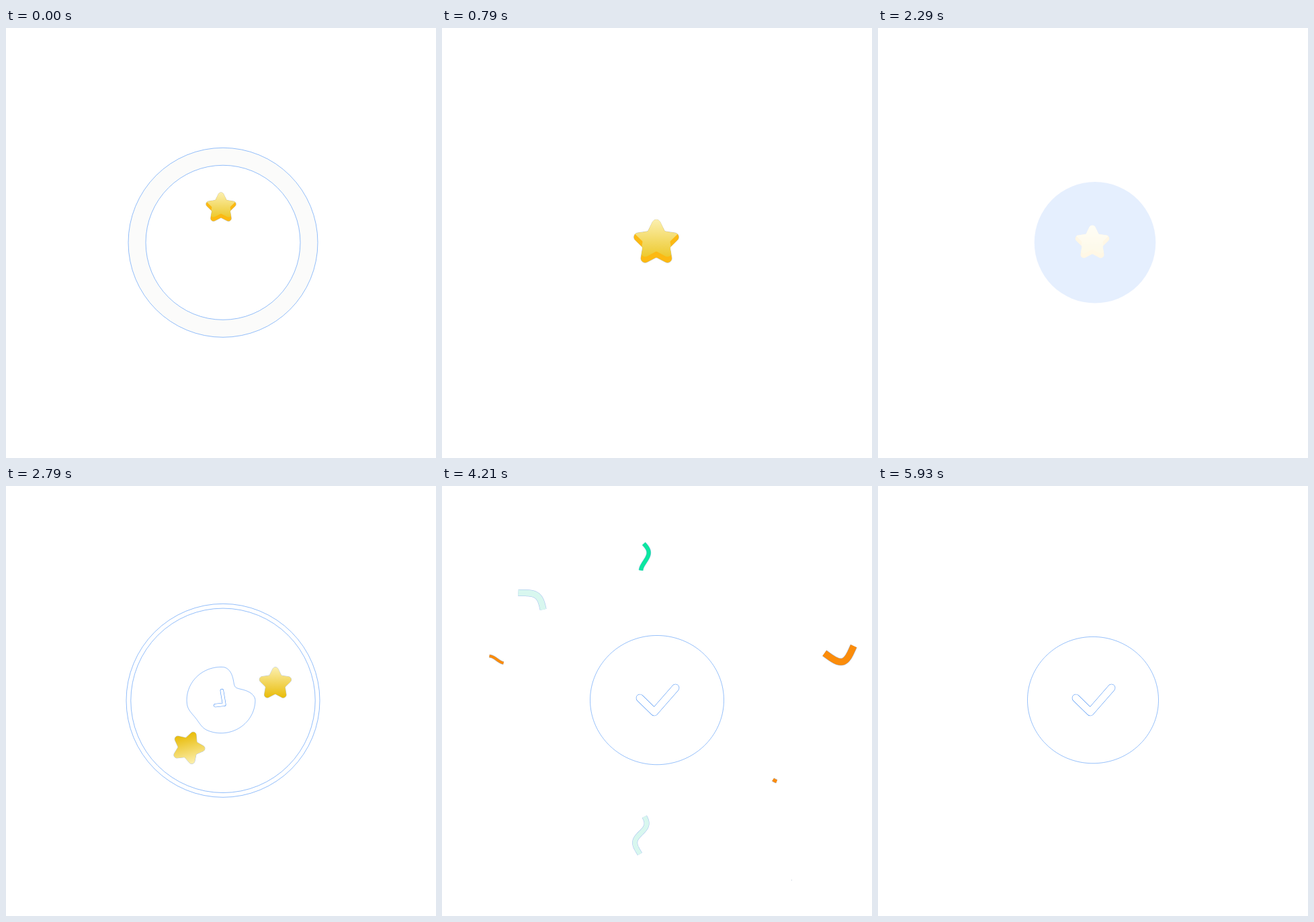
These frames come from a looping animation (640x640 px, 6000 ms). An HTML page with a canvas:

```html
<!DOCTYPE html>
<html lang="en">
<head>
<meta charset="utf-8">
<title>Success</title>
<style>
  html, body { margin: 0; width: 100%; height: 100%; overflow: hidden; background: #fff; }
  canvas { display: block; width: 640px; height: 640px; }
</style>
</head>
<body>
<canvas id="stage" width="640" height="640"></canvas>
<script>
const ctx = document.getElementById('stage').getContext('2d');
const LOOP = 6000, STEP = LOOP / 84, TAU = Math.PI * 2, CENTER = 320;
const BURST = 1640, BADGE = 2290, COAST = 4210;
const BLUE = '#166cf5', LINE = '#4a92f6', EDGE = 'rgba(50,110,220,.45)';
const YELLOW = '#ffcb3d', GREEN = '#0ce79f', ORANGE = '#fb8c0a', MINT = '#d8f7ef';

const radians = deg => deg * Math.PI / 180;
const mix = (a, b, p) => a + (b - a) * p;
const progress = (from, to, t) => Math.max(0, Math.min(1, (t - from) / (to - from)));
const smooth = p => p * p * (3 - 2 * p);
const easeOut = (p, power) => 1 - (1 - p) ** power;

// Stars fly out from the centre, turning and shrinking over their life.
const flyingStars = [
  { angle: -6, turn: -.0205, tilt: -11, launch: 2220, speed: .15, life: 1620 },
  { angle: 125, turn: 0, tilt: 154, launch: 2220, speed: .15, life: 1620 },
  { angle: 203.4, turn: 0, tilt: 5, launch: 2820, speed: .25, life: 1120 },
  { angle: 53.1, turn: 0, tilt: 78, launch: 2880, speed: .25, life: 1340 }
];

// Ribbons run outward along a wave with a crest at a given distance,
// and are swallowed at `end`, which the head reaches at `arrive`.
const ribbon = (color, angle, wave, crest, end, arrive, extra) =>
  ({ color, angle, wave, crest, end, arrive, width: 6, length: 45, speed: .18, start: 95, ...extra });
const ribbons = [
  ribbon(YELLOW, 180, 75, 172, 186, 3570, { width: 7, length: 52 }),
  ribbon(YELLOW, -39, 75, 175, 188, 3570, { width: 7, length: 52 }),
  ribbon(GREEN, 152, 56, 198, 209, 3570),
  ribbon(GREEN, 12, 46, 187, 200, 3570),
  ribbon(MINT, 219, 75, 237, 262, 4210, { width: 9 }),
  ribbon(ORANGE, -15, 77, 282, 304, 4210, { width: 10, amp: 15 }),
  ribbon(GREEN, -95, 56, 222, 235, 4140, { length: 52, start: 125 }),
  ribbon(MINT, 97, 56, 212, 234, 4233, { width: 7, length: 56, speed: .22, start: 83 }),
  ribbon(ORANGE, 194.5, 40, 256, 268, 4265, { width: 4, length: 23, amp: 2.5 }),
  ribbon(ORANGE, 30, 120, 210, 275, 4549, { width: 5, length: 15, start: 208 })
];

function starPath(size, dy = 0) {
  const vertex = i => {
    const a = i * Math.PI / 5 - Math.PI / 2, r = size * (i % 2 ? .648 : 1.297);
    return [r * Math.cos(a), r * Math.sin(a) + dy];
  };
  const [x0, y0] = vertex(0), [x1, y1] = vertex(-1);
  ctx.beginPath();
  ctx.moveTo((x0 + x1) / 2, (y0 + y1) / 2);
  for (let i = 0; i < 10; i++) ctx.arcTo(...vertex(i), ...vertex(i + 1), size * (i % 2 ? .08 : .194));
  ctx.closePath();
}

function drawStar(x, y, size, rotation = 0, solid = false) {
  const shade = ctx.createLinearGradient(0, -size, 0, size * .85);
  shade.addColorStop(0, '#fbeeaa');
  shade.addColorStop(1, solid ? '#ebc41c' : '#e9bd0c');
  ctx.save();
  ctx.translate(x, y);
  ctx.rotate(radians(rotation));
  starPath(size);
  ctx.strokeStyle = 'rgba(60,100,160,.45)';
  ctx.lineWidth = .8;
  ctx.stroke();
  ctx.fillStyle = solid ? '#fcb912' : shade;
  ctx.fill();
  if (solid) {
    // the raised face leaves a rim along the lower edges
    ctx.clip();
    starPath(size, -size * .27);
    ctx.fillStyle = shade;
    ctx.fill();
    ctx.fillRect(-size * .3, -size * 1.1, size * .6, size * .9);
  }
  ctx.restore();
}

function drawHeroStar(t) {
  const drop = smooth(progress(0, 720, t)), fade = progress(BURST, 2210, t);
  drawStar(CENTER - drop, mix(268, 320, drop), mix(22, 33, drop) - 8 * fade, 0, true);
}

function outline() {
  ctx.strokeStyle = LINE;
  ctx.lineWidth = .6;
  ctx.stroke();
}

function fillCircle(r, fill) {
  ctx.beginPath();
  ctx.arc(323, 319.3, r, 0, TAU);
  ctx.fillStyle = fill;
  ctx.fill();
}

function drawRing(outer, inner, fill) {
  fillCircle(outer, fill);
  outline();
  fillCircle(inner, '#fff');
  outline();
}

function drawBurst(t) {
  const p = progress(BURST, 2860, t);
  const outer = 149 * (1.17 * p - .17 * p ** 4);
  if (t >= BADGE) return drawRing(outer, outer * easeOut(progress(BADGE, 2860, t), 1.5), '#fff');
  fillCircle(outer, BLUE);
  drawHeroStar(t);
  // a white veil fades disc and star together
  fillCircle(Math.max(outer, 42) + 1, `rgba(255,255,255,${progress(BURST, 2365, t)})`);
}

function drawBadge(t) {
  const rx = 99.5 * easeOut(progress(BADGE, COAST, t), 2.4) - 2 * progress(COAST, 5430, t);
  const dent = 1 - progress(BADGE, 3570, t);
  const dip = (deg, center, reach) => Math.cos(Math.PI / 2 * Math.min(1, Math.abs(deg - center) / reach)) ** 2;
  ctx.beginPath();
  for (let deg = 0; deg < 360; deg++) {
    const r = rx * (1 - dent * (.69 * dip(deg, 317, 44) + .13 * dip(deg, 143, 30)));
    ctx.lineTo(CENTER + r * Math.cos(radians(deg)), 318.6 + .966 * r * Math.sin(radians(deg)));
  }
  ctx.closePath();
  outline();
}

function drawCheck(t) {
  const grow = progress(BADGE, 3426, t);
  ctx.save();
  ctx.translate(CENTER, 319);
  ctx.rotate((grow - 1) * Math.PI / 2);
  ctx.scale(grow, grow);
  ctx.lineCap = ctx.lineJoin = 'round';
  ctx.beginPath();
  ctx.moveTo(-25.5, -3.5);
  ctx.lineTo(-4, 17.5);
  ctx.lineTo(27.5, -18.5);
  for (const [color, extra] of [[LINE, .6], ['#fff', -.6]]) {
    ctx.strokeStyle = color;
    ctx.lineWidth = 11 + extra / grow;
    ctx.stroke();
  }
  ctx.restore();
}

function drawRibbon({ color, angle, wave, crest, end, arrive, width, length, speed, start, amp = wave / 8 }, t) {
  const clock = t < COAST ? t : mix(COAST, t, .25);
  const front = end + (clock - arrive) * speed;
  const head = Math.min(end, front), tail = Math.max(start, front - length);
  if (head - tail < .5) return;
  ctx.save();
  ctx.translate(CENTER, CENTER);
  ctx.rotate(radians(angle));
  ctx.beginPath();
  for (let i = 0; i <= 30; i++) {
    const d = mix(tail, head, i / 30);
    ctx.lineTo(d, amp * Math.cos(TAU * (d - crest) / wave));
  }
  ctx.lineJoin = 'round';
  for (const [style, extra] of [[EDGE, 1], [color, 0]]) {
    ctx.strokeStyle = style;
    ctx.lineWidth = width + extra;
    ctx.stroke();
  }
  ctx.restore();
}

function drawFlyingStar({ angle, turn, tilt, launch, speed, life }, t) {
  const age = t - launch;
  if (age <= 0 || age >= life) return;
  const a = radians(angle + turn * age), d = speed * age;
  const size = 36 * (1 - age / life) * Math.min(1, age / 300);
  drawStar(CENTER + d * Math.cos(a), CENTER + d * Math.sin(a), size, tilt + .02 * age);
}

function draw(now) {
  const t = Math.floor((now % LOOP + 4) / STEP) * STEP % LOOP;
  ctx.fillStyle = '#fff';
  ctx.fillRect(0, 0, 640, 640);
  if (t < 750) drawRing(141 - t / 750, 115 + 24.5 * t / 750, '#fbfbfa');
  if (t < BURST) drawHeroStar(t);
  else if (t < 2900) drawBurst(t);
  if (t > BADGE) {
    drawBadge(t);
    drawCheck(t);
    ribbons.forEach(r => drawRibbon(r, t));
    flyingStars.forEach(s => drawFlyingStar(s, t));
  }
}

const began = performance.now();
function tick() {
  draw(performance.now() - began);
  requestAnimationFrame(tick);
}
tick();
</script>
</body>
</html>
```
